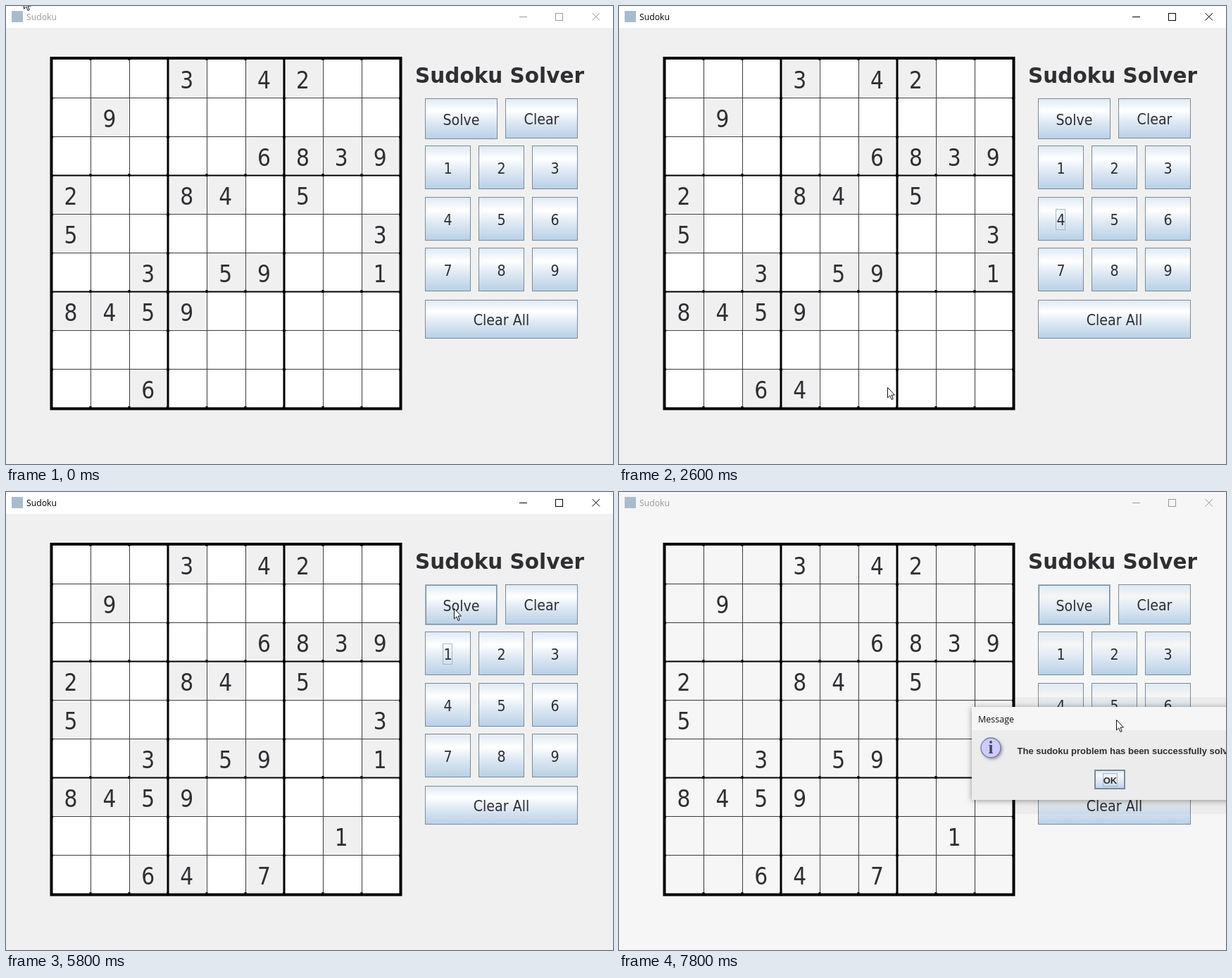
Animation of 862x650 px, one loop 8 s. Source, as an HTML page with a canvas:

```html
<!DOCTYPE html>
<html lang="en">
<head>
<meta charset="utf-8">
<title>Sudoku</title>
<style>
html, body { margin: 0; width: 100%; height: 100%; overflow: hidden; background: #f0f0f0; }
canvas { display: block; }
</style>
</head>
<body>
<canvas id="stage" width="862" height="650"></canvas>
<script>
const ctx = document.getElementById('stage').getContext('2d');
const LOOP = 8000, STEP = 100, ACTIVE = 900, SOLVED = 6400;
const LEFT = 65, TOP = 75, CELL = 55;
const INK = '#2f2f33', EDGE = '#7a8a99', SOFT = '#a3b8cc';
const UI = '"DejaVu Sans Condensed", "DejaVu Sans", sans-serif';
const WINDOW = '"Open Sans", "Noto Sans", sans-serif';
const DIALOG = '"Liberation Sans", Arial, sans-serif';

const CLUES = [
  '...3.42..', '.9.......', '.....6839',
  '2..84.5..', '5.......3', '..3.59..1',
  '8459.....', '.........', '..6......'
];

// Each move: pick a cell, then press a number button
const MOVES = [
  { row: 8, col: 3, key: '4', pick: 900, press: 1700 },
  { row: 8, col: 5, key: '7', pick: 2800, press: 3600 },
  { row: 7, col: 7, key: '1', pick: 4200, press: 5200 }
];
const PRESSES = [...MOVES, { key: 'Solve', press: SOLVED - 200 }];

const button = (label, x, y, w, h) => ({ label, x, y, w, h });
const BUTTONS = [
  button('Solve', 595, 131, 103, 58),
  button('Clear', 709, 131, 103, 57),
  button('Clear All', 595, 417, 217, 55)
];
for (let i = 0; i < 9; i++) {
  const y = 198 + Math.round(72.7 * Math.floor(i / 3));
  BUTTONS.push(button(String(i + 1), 595 + 76 * (i % 3), y, 65, 62));
}

// Pointer glides: depart, arrive, x, y
const GLIDES = [
  [100, 600, 236, 570], [600, 1000, 274, 535],
  [1100, 1700, 631, 316], [1800, 2000, 529, 414],
  [2100, 2300, 387, 535], [2400, 2600, 381, 541],
  [2700, 3200, 633, 361], [3550, 4270, 473, 489],
  [4400, 5000, 630, 225], [5200, 5300, 640, 195],
  [5500, 5800, 636, 165], [6900, 7400, 692, 411], [7400, 7800, 706, 323]
];

function cursorAt(t) {
  let x = 25, y = -11;
  for (const [depart, arrive, tx, ty] of GLIDES) {
    const u = Math.min(1, Math.max(0, (t - depart) / (arrive - depart)));
    const e = u * u * (3 - 2 * u);
    x += (tx - x) * e;
    y += (ty - y) * e;
  }
  return [x, y];
}

function rect(x, y, w, h, color) {
  ctx.fillStyle = color;
  ctx.fillRect(x, y, w, h);
}

function frame(x, y, w, h, color) {
  ctx.strokeStyle = color;
  ctx.lineWidth = 1;
  ctx.strokeRect(x + 0.5, y + 0.5, w - 1, h - 1);
}

function line(x0, y0, x1, y1, color, width = 1) {
  ctx.strokeStyle = color;
  ctx.lineWidth = width;
  ctx.beginPath();
  ctx.moveTo(x0, y0);
  ctx.lineTo(x1, y1);
  ctx.stroke();
}

function text(str, x, y, font, color = INK, align = 'left') {
  ctx.font = font;
  ctx.fillStyle = color;
  ctx.textAlign = align;
  ctx.fillText(str, x, y);
}

function metal(x, y, w, h, paper) {
  const g = ctx.createLinearGradient(0, y, 0, y + h);
  g.addColorStop(0, '#dde8f3');
  g.addColorStop(0.3, paper);
  g.addColorStop(0.6, '#dde8f3');
  g.addColorStop(1, '#b8cfe5');
  rect(x, y, w, h, g);
}

function drawButton({ label, x, y, w, h }, { hover, pressed, focus, paper }) {
  const cx = x + w / 2, cy = y + h / 2;
  if (pressed) rect(x, y, w, h, '#b8cfe5');
  else metal(x, y, w, h, paper);
  frame(x, y, w, h, hover ? SOFT : EDGE);
  if (hover) frame(x + 1, y + 1, w - 2, h - 2, EDGE);
  text(label, cx, cy + 8.5, '21.2px ' + UI, INK, 'center');
  if (focus) {
    const half = label.length === 1 ? 7 : 27;
    frame(Math.floor(cx) - half, Math.floor(cy) - 14, half * 2, 30, SOFT);
  }
}

function drawTitleBar(active, paper) {
  const color = active ? '#000' : '#999';
  rect(0, 0, 862, 31, paper);
  rect(8, 7, 16, 16, '#a9bccd');
  text('Sudoku', 29, 20, '12.2px ' + WINDOW, color);
  rect(729, 15, 11, 1, color);
  frame(780, 10, 11, 11, color);
  line(832.5, 10, 843, 20.5, color);
  line(843, 10, 832.5, 20.5, color);
}

function drawGrid(t, paper, base) {
  const size = CELL * 9, right = LEFT + size, bottom = TOP + size;
  const fill = (r, c, color) =>
    rect(LEFT + 1 + CELL * c, TOP + 1 + CELL * r, 53, 53, color);
  const digit = (r, c, d) => {
    fill(r, c, base);
    text(d, LEFT + 27 + 54.9 * c, TOP + 41.5 + CELL * r, '33px ' + UI, INK, 'center');
  };

  rect(LEFT, TOP, size, size, paper);
  CLUES.forEach((row, r) => [...row].forEach((d, c) => d !== '.' && digit(r, c, d)));
  for (const m of MOVES) {
    if (t >= m.press + STEP) digit(m.row, m.col, m.key);
    else if (t >= m.pick) fill(m.row, m.col, '#00ffff');
  }

  for (let i = 1; i < 9; i++) {
    const heavy = i % 3 === 0;
    const x = LEFT + CELL * i + (heavy ? 0 : 0.5), y = TOP + CELL * i + 0.5;
    line(x, TOP, x, bottom, heavy ? '#000' : '#3a3a3a', heavy ? 3 : 1);
    line(LEFT, y, right, y, heavy ? '#000' : '#3a3a3a', heavy ? 2 : 1);
    // Small knots where thin lines meet the heavy ones
    for (let q = 0; q <= size; q += CELL * 3) {
      rect(x - 2, TOP + q - 2, 3, 4, '#000');
      rect(LEFT + q - 2, y - 1, 4, 3, '#000');
    }
  }
  ctx.strokeStyle = '#000';
  ctx.lineWidth = 4;
  ctx.strokeRect(LEFT - 0.5, TOP - 1, size + 1, size + 2.5);
}

function shadow(blur, dx, dy) {
  ctx.shadowColor = blur ? 'rgba(0,0,0,.4)' : 'transparent';
  ctx.shadowBlur = blur;
  ctx.shadowOffsetX = dx;
  ctx.shadowOffsetY = dy;
}

function drawDialog(alpha, paper) {
  const bold = 'bold 13px ' + DIALOG;
  ctx.save();
  ctx.globalAlpha = alpha;
  rect(562, 291, 300, 166, 'rgba(0,0,0,.04)');
  shadow(8, 0, 1);
  rect(501, 305, 400, 132, '#ececec');
  shadow(0, 0, 0);
  rect(501, 305, 400, 33, paper);
  text('Message', 510, 327, '12.5px ' + WINDOW, '#111');

  shadow(4, 2, 2);
  ctx.beginPath();
  ctx.arc(528, 363, 14, 0, Math.PI * 2);
  ctx.fillStyle = '#ccccff';
  ctx.fill();
  shadow(0, 0, 0);
  ctx.strokeStyle = '#7777aa';
  ctx.lineWidth = 1.3;
  ctx.stroke();
  text('i', 528, 371, 'bold 25px "Liberation Serif", serif', '#444466', 'center');

  text('The sudoku problem has been successfully solved!', 565.5, 371.5, bold);
  metal(675, 394, 44, 28, paper);
  frame(675, 394, 44, 28, EDGE);
  frame(676, 395, 42, 26, EDGE);
  frame(687, 399, 21, 19, SOFT);
  text('OK', 697.5, 413.5, bold, INK, 'center');
  ctx.restore();
}

function drawCursor(x, y) {
  ctx.save();
  ctx.translate(Math.round(x) + 0.5, Math.round(y) + 0.5);
  ctx.lineWidth = 1;
  ctx.strokeStyle = '#111';
  ctx.fillStyle = '#fff';
  const arrow = new Path2D('M0 0V14.5L3.3 11.4 5.6 17 7.8 16 5.5 10.6H10Z');
  ctx.fill(arrow);
  ctx.stroke(arrow);
  ctx.restore();
}

function draw(t) {
  const solved = t >= SOLVED;
  const active = t >= ACTIVE && !solved;
  const paper = solved ? '#f6f6f6' : '#ffffff';
  const base = solved ? paper : '#f0f0f0';

  rect(0, 0, 862, 650, base);
  drawTitleBar(active, paper);
  drawGrid(t, paper, base);
  text('Sudoku Solver', 701, 109, 'bold 29.5px "DejaVu Sans", sans-serif', INK, 'center');

  const last = PRESSES.filter(p => t >= p.press).pop() || { key: '9', press: -LOOP };
  const held = t < last.press + (last.key === 'Solve' ? 200 : STEP);
  const [hx, hy] = cursorAt(Math.min(t, SOLVED) - STEP);
  for (const b of BUTTONS) {
    drawButton(b, {
      paper,
      hover: hx >= b.x && hx < b.x + b.w && hy >= b.y && hy < b.y + b.h,
      pressed: held && last.key === b.label,
      focus: active && last.key === b.label
    });
  }

  if (solved) drawDialog(1 - 0.7 * Math.pow(0.25, (t - SOLVED) / STEP), paper);
  drawCursor(...cursorAt(t));
}

function tick() {
  const t = performance.now() % LOOP;
  draw(Math.floor(t / STEP) * STEP);
  requestAnimationFrame(tick);
}
tick();
</script>
</body>
</html>
```
